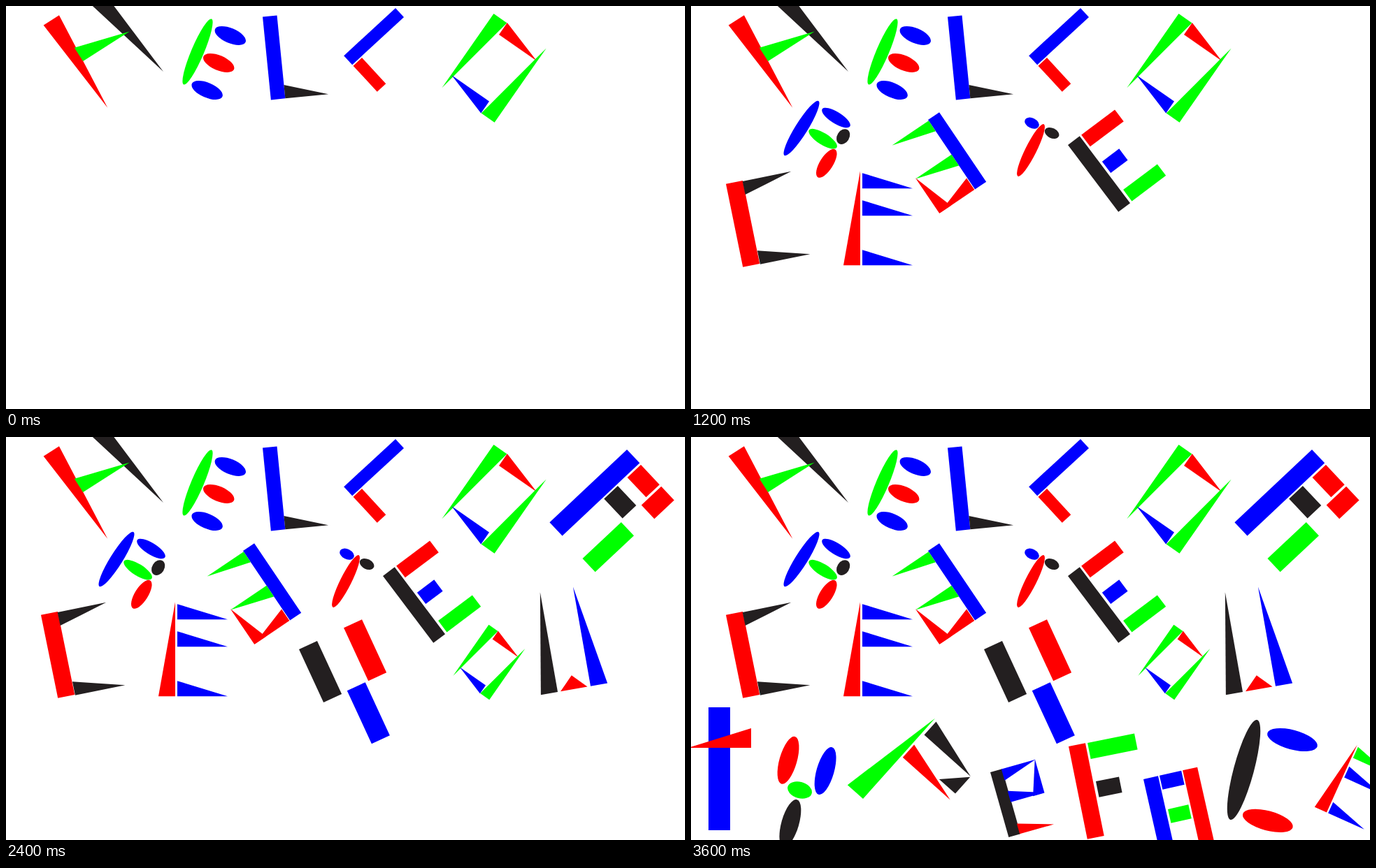
Write an HTML page that moves like this. It is 971 px wide and 577 px high and loops after 4.8 s.

```html
<!DOCTYPE html>
<html lang="en">
<head>
<meta charset="utf-8">
<title>Hello Typeface</title>
<style>
html, body { margin: 0; width: 100%; height: 100%; overflow: hidden; background: #fff; }
svg { display: block; }
.r { fill: #f00; }
.g { fill: #0f0; }
.b { fill: #00f; }
.k { fill: #231f20; }
</style>
</head>
<body>
<svg id="stage" width="971" height="577" viewBox="0 0 971 577"></svg>
<script>
const STEP = 1200;
let word, letter;

function add(parent, tag, attrs = {}) {
  const el = document.createElementNS("http://www.w3.org/2000/svg", tag);
  for (const key in attrs) el.setAttribute(key, attrs[key]);
  return parent.appendChild(el);
}

// Opens a letter; its parts are drawn upright in its own turned frame.
function at(x, y, turn = 0, size = 1) {
  letter = add(word, "g", { transform: `translate(${x} ${y}) rotate(${turn}) scale(${size})` });
}

const bar = (color, x, y, width, height) => add(letter, "rect", { class: color, x, y, width, height });
const oval = (color, cx, cy, rx, ry) => add(letter, "ellipse", { class: color, cx, cy, rx, ry });
const poly = (color, ...points) => add(letter, "polygon", { class: color, points: points.join(" ") });
// Right triangle with its square corner at x,y and legs w and h.
const wedge = (color, x, y, w, h) => poly(color, x, y, x + w, y, x, y + h);
// Symmetric triangle with its base centred on x,y.
const spike = (color, x, y, w, h) => poly(color, x - w / 2, y, x + w / 2, y, x, y + h);

function wedgeO(x, y, size) {
  for (const [half, inner] of [[0, "r"], [180, "b"]]) {
    at(x, y, 34.9 + half, size);
    wedge("g", -45, -63.5, 23, 129.5);
    wedge(inner, -21.6, -43.2, 65.6, -20.6);
  }
}

function wedgeE(x, y, turn, size, top) {
  at(x, y, turn, size);
  wedge("r", 0, 0, -24, -135);
  wedge("b", 3, 0, 72, -22);
  wedge("b", 3, -71, 72, -22);
  wedge(top, 3, -110, 72, -22);
}

function hello() {
  at(125.3, -16.7, -42); // H
  spike("k", 0, 0, 26.5, 149);
  at(64.8, 20.3, -32.7);
  spike("r", 0, 0, 26.5, 149);
  wedge("g", 6.4, 74, 79, -23);
  at(274, 65.5, 23); // E
  oval("g", 0, 0, 9, 51);
  ["b", "r", "b"].forEach((color, i) => oval(color, 34, 42.4 * i - 39.5, 23.7, 10.7));
  at(367, 15.5, -5.7); // L
  bar("b", 0, 0, 20.6, 119.5);
  wedge("k", 20.6, 119.5, 62, -19.5);
  at(557, 3, 47.3); // L
  bar("b", 0, 0, 17.7, 100.5);
  bar("r", 19.7, 83.5, 50.5, 17);
  wedgeO(698, 88.8, 1);
}

function creative() {
  at(158, 175, 32); // R
  oval("b", 0, 0, 8.8, 46);
  oval("b", 34, -39, 23.4, 8.3);
  oval("g", 34, -3.4, 23.4, 8.3);
  oval("k", 57, -21.4, 8.7, 11.6);
  oval("r", 57, 23.7, 9.5, 23.4);
  at(339, 163, -34); // A
  bar("b", 0, 0, 19.4, 120);
  wedge("g", 0, 1.5, -63, 18);
  wedge("g", 0, 60, -62, 19);
  wedge("r", -1, 120, -61, -20);
  wedge("r", -61.5, 120, 20, -61);
  at(486, 206.5, 26.5); // I
  oval("r", 0, 0, 8, 41.7);
  oval("b", -16, -35.4, 10.9, 7.2);
  oval("k", 16, -35.4, 10.9, 7.2);
  at(539, 199, -37); // E
  bar("k", 0, 0, 21, 120);
  bar("r", 24, 0, 60, 21);
  bar("b", 24.8, 48.3, 30.5, 20.5);
  bar("g", 24.6, 98.8, 61, 20.5);
  at(49, 255, -11.5); // C
  bar("r", 1, 0, 24.5, 121.5);
  wedge("k", 25, 1, 71, 19.5);
  wedge("k", 26, 122.5, 73, -20);
  wedgeE(242, 371.2, 0, 1, "b");
}

function your() {
  at(888, 18, 46.7); // R
  bar("b", 0, 0, 26.5, 152);
  bar("r", 29.5, 0.5, 39, 26.5);
  bar("r", 72, 0.5, 27, 39);
  bar("k", 28.8, 45.2, 38.5, 27);
  bar("g", 70, 77.3, 26.5, 76);
  at(419, 304, -24.8); // Y
  bar("k", 0, 0, 28.6, 83.7);
  bar("r", 71, -1, 28.6, 83.7);
  bar("b", 37.6, 82.6, 28.6, 83.7);
  wedgeO(690.8, 322.5, 0.69);
  at(789, 365, -10); // U
  wedge("k", 0, 0, -24.5, -145);
  wedge("b", 47.7, 0, 24.5, -144.5);
  spike("r", 23.6, 0, 39, -20);
}

function typeface() {
  at(25, 387); // T
  bar("b", 0, 0, 31, 176);
  wedge("r", 61, 58, -90, -28);
  at(155.5, 505.5, 16); // Y
  oval("r", -27.6, -36.5, 12.5, 35.2);
  oval("b", 27.6, -36.5, 12.5, 35.2);
  oval("k", 0, 49.4, 12.5, 35.2);
  oval("g", 0, 0, 17.8, 11.6);
  at(246, 518, 41.8); // P
  wedge("g", 0, 0, -29.8, -154.5);
  wedge("k", 4.3, -126.5, 89, -25.5);
  wedge("r", 2.9, -82, 91, -24.5);
  wedge("k", 93.4, -93.5, -31, -32);
  at(428, 480, -15.8); // E
  bar("k", 0, 0, 17.5, 96.6);
  wedge("b", 16.5, 0, 50.5, 17);
  wedge("b", 66.5, 49.5, -17, -50.5);
  wedge("b", 16.5, 49, 50, -16.5);
  wedge("r", 16.5, 96.5, 50.7, -15.5);
  at(540, 443, -11.4); // F
  bar("r", 0, 0, 24.4, 135.5);
  bar("g", 27.5, 0.5, 68.3, 23.3);
  bar("k", 28.3, 56.8, 33.7, 23);
  at(647, 490, -12.7); // A
  bar("b", 0, 0, 21.5, 100);
  bar("r", 57.5, 0, 21.5, 120);
  bar("b", 23.5, 0, 32, 20.4);
  bar("g", 24.7, 49.6, 30, 20.4);
  at(790.5, 476.5, 15); // C
  oval("k", 0, 0, 14.5, 74);
  oval("b", 56, -59.5, 37, 14);
  oval("r", 52, 61.5, 37, 14);
  wedgeE(909, 537.5, 24.3, 0.787, "g");
}

const stage = document.getElementById("stage");
const words = [hello, creative, your, typeface].map(draw => {
  word = add(stage, "g");
  draw();
  return word;
});

const start = performance.now();
function tick() {
  const shown = Math.floor((performance.now() - start) / STEP) % words.length;
  words.forEach((w, i) => w.setAttribute("visibility", i <= shown ? "visible" : "hidden"));
  requestAnimationFrame(tick);
}
tick();
</script>
</body>
</html>
```
